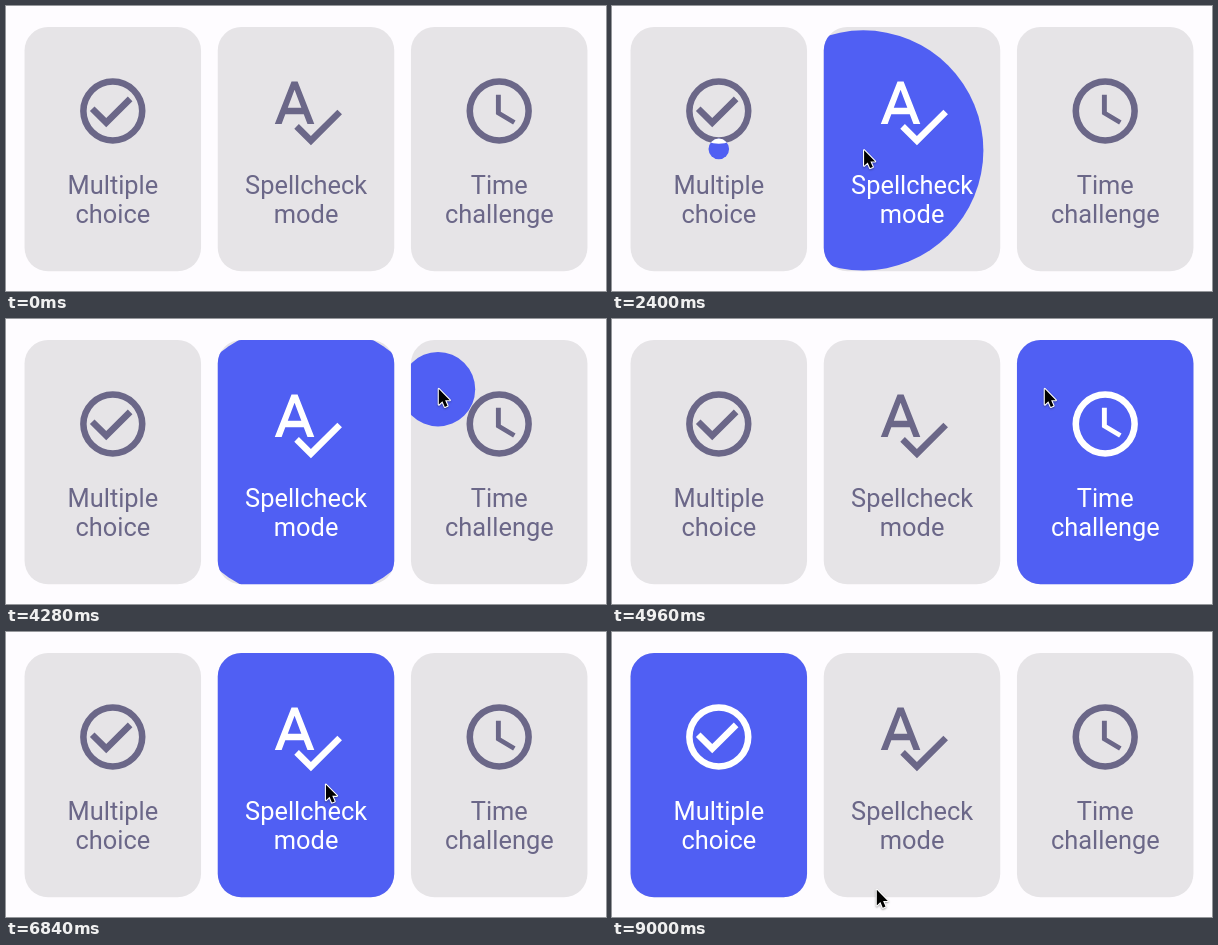
An HTML page with a canvas for the animation above (9.2 s loop, 600x285 px).

```html
<!DOCTYPE html>
<html lang="en">
<head>
<meta charset="utf-8">
<title>Quiz mode cards</title>
<style>
  html, body { margin: 0; width: 100%; height: 100%; overflow: hidden; background: #fefcff; }
  canvas { display: block; width: 600px; height: 285px; }
</style>
</head>
<body>
<canvas id="stage"></canvas>
<script>
const W = 600, H = 285, LOOP = 9200, TICK = 40;
const PAGE = '#fefcff', CARD = '#e6e4e7', INK = '#6b6788', BLUE = '#505ff3', WHITE = '#fff';
const CARD_W = 176.5, CARD_H = 244.3, TOP = 21, MID_Y = 142.9, ICON = 3.27;

const canvas = document.getElementById('stage');
const ctx = canvas.getContext('2d');
const dpr = window.devicePixelRatio || 1;
canvas.width = W * dpr;
canvas.height = H * dpr;

// Icons live on a 24-unit grid.
function icon(d, ringed) {
  const path = new Path2D(d);
  if (ringed) {
    path.moveTo(22, 12);
    path.arc(12, 12, 10, 0, 2 * Math.PI);
    path.moveTo(20, 12);
    path.arc(12, 12, 8, 0, 2 * Math.PI, true);
  }
  return path;
}

const check = icon('M16.59 7.58L10 14.17l-3.59-3.58L5 12l5 5 8-8z', true);
const clock = icon('M12.5 7H11v6l5.25 3.15.75-1.23-4.5-2.67z', true);
const spell = icon('M12.45 16h2.09L9.43 3H7.57L2.46 16h2.09l1.12-3h5.64l1.14 3z' +
  'm-6.02-5L8.5 5.48 10.57 11H6.43zm15.16.59l-8.09 8.09L9.83 16l-1.41 1.41 5.09 5.09L23 13z');
const arrow = new Path2D('M0 0V15.6L3.6 12.2 6 17.9 8.7 16.8 6.3 11.2H11Z');

const cards = [
  { icon: check, lines: ['Multiple', 'choice'] },
  { icon: spell, lines: ['Spellcheck', 'mode'] },
  { icon: clock, lines: ['Time', 'challenge'] }
];
cards.forEach((c, i) => {
  c.mid = W / 2 + (i - 1) * 193.2;
  c.shape = new Path2D();
  c.shape.roundRect(c.mid - CARD_W / 2, TOP, CARD_W, CARD_H, 23.5);
});

// Each stop: the pointer travels there between two times, then may click.
// Ripple speed is in px per ms.
const stops = [
  { from: 0, to: 120, x: 213, y: 234 },
  { from: 120, to: 400, x: 174, y: 150, click: 700, card: 0, speed: 0.66 },
  { from: 1240, to: 2120, x: 251.3, y: 144.4, click: 2242, card: 1, speed: 0.76 },
  { from: 2800, to: 3600, x: 432, y: 70.2, click: 4218, card: 2, speed: 0.6 },
  { from: 5120, to: 6040, x: 341, y: 144.4, click: 6242, card: 1, speed: 0.76 },
  { from: 6800, to: 7600, x: 159.5, y: 144.4, click: 7614, card: 0, speed: 0.54 },
  { from: 8320, to: 9000, x: 264, y: 258 }
];
const clicks = stops.filter(s => s.click);

// Quick start, soft landing, on a path that sags with its length.
function pointerAt(t) {
  const i = stops.findLastIndex(s => s.from <= t);
  const b = stops[i], a = stops[i - 1] || b;
  const u = 1 - (1 - Math.min(1, (t - b.from) / (b.to - b.from))) ** 2.5;
  const dx = b.x - a.x, dy = b.y - a.y;
  const sag = 0.44 * u * (1 - u) * Math.hypot(dx, dy);
  return [a.x + dx * u, a.y + dy * u + sag - 1.2];
}

function drawCard(c, back, ink) {
  ctx.fillStyle = back;
  ctx.fill(c.shape);
  ctx.fillStyle = ink;
  ctx.save();
  ctx.translate(c.mid - 12 * ICON, 105 - 12 * ICON);
  ctx.scale(ICON, ICON);
  ctx.fill(c.icon);
  ctx.restore();
  ctx.font = '25.4px Roboto, sans-serif';
  ctx.textAlign = 'center';
  c.lines.forEach((line, i) => ctx.fillText(line, c.mid + 0.1, 188 + i * 29.4));
}

function drawRipple(c, x, y, r) {
  if (r <= 0) return;
  ctx.save();
  ctx.beginPath();
  ctx.arc(x, y, r, 0, 2 * Math.PI);
  ctx.clip();
  drawCard(c, BLUE, WHITE);
  ctx.restore();
}

function drawPointer(x, y) {
  ctx.save();
  ctx.translate(x + 0.8, y + 1);
  ctx.lineJoin = 'round';
  ctx.lineWidth = 2.2;
  ctx.strokeStyle = WHITE;
  ctx.shadowColor = 'rgba(0,0,0,.35)';
  ctx.shadowBlur = 2 * dpr;
  ctx.shadowOffsetY = dpr;
  ctx.stroke(arrow);
  ctx.shadowColor = 'transparent';
  ctx.fillStyle = '#000';
  ctx.fill(arrow);
  ctx.restore();
}

function draw(t) {
  ctx.setTransform(dpr, 0, 0, dpr, 0, 0);
  ctx.fillStyle = PAGE;
  ctx.fillRect(0, 0, W, H);
  for (const c of cards) drawCard(c, CARD, INK);

  const [last, now] = [undefined, ...clicks.filter(k => k.click <= t)].slice(-2);
  if (now) {
    const r = now.speed * (t - now.click);
    drawRipple(cards[now.card], now.x, now.y, r);
    // The previous choice closes towards its centre.
    if (last) drawRipple(cards[last.card], cards[last.card].mid, MID_Y, 197 - 1.555 * r);
  }
  if (t >= stops[0].to) drawPointer(...pointerAt(t));
}

const start = performance.now();
function loop() {
  const t = Math.max(0, performance.now() - start) % LOOP;
  draw(Math.floor(t / TICK) * TICK);
  requestAnimationFrame(loop);
}
loop();
</script>
</body>
</html>
```
